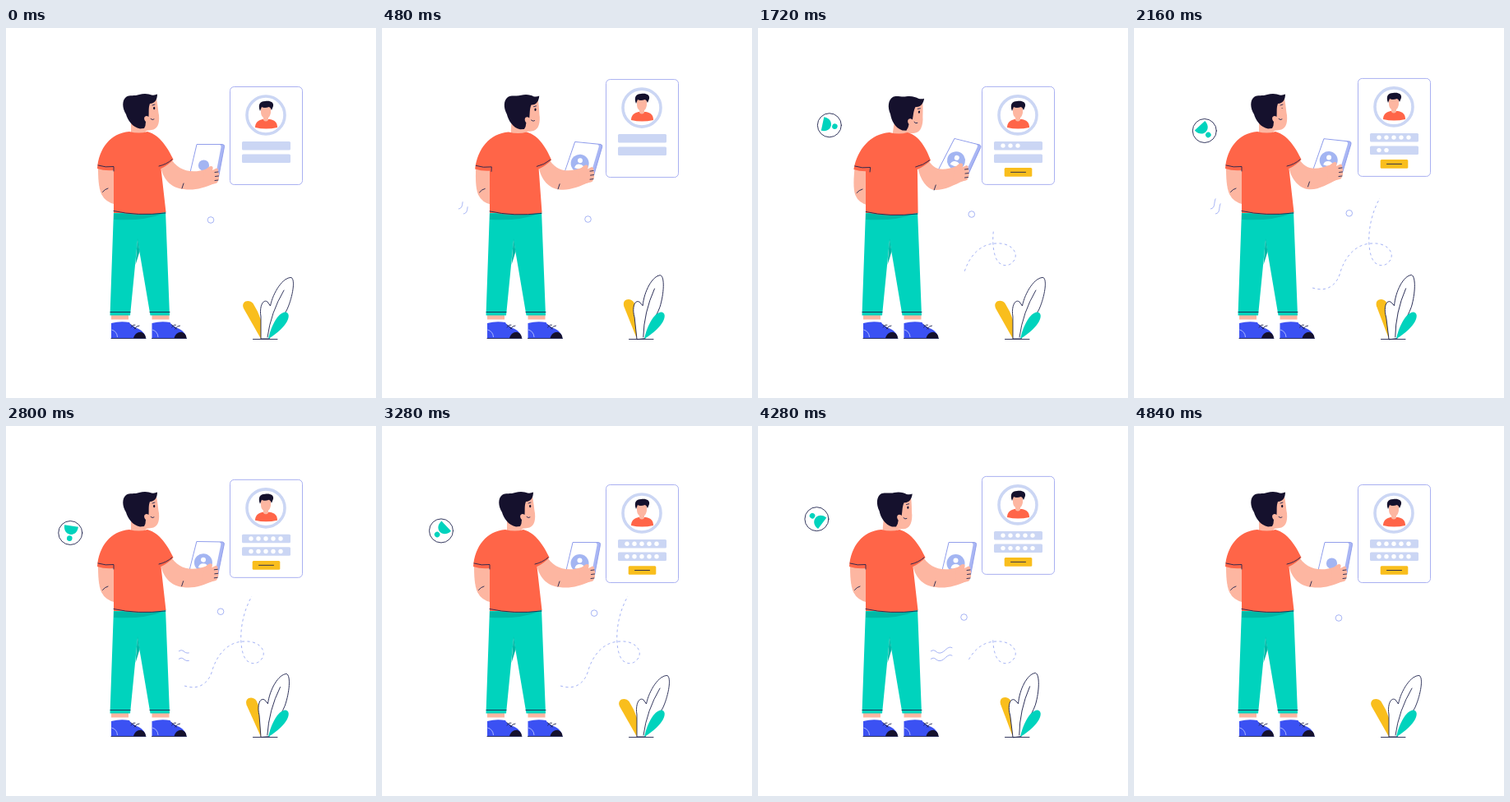
Recreate the animation shown at these times as an HTML page. Size 450x450 px, loop 4.88 s.

```html
<!DOCTYPE html>
<html lang="en">
<head>
<meta charset="utf-8">
<title>Profile login</title>
<style>
  html, body { margin: 0; width: 100%; height: 100%; overflow: hidden; background: #fff; }
  svg { display: block; width: 100vw; height: 100vh; }
  .skin { fill: #fdb6a1; }
  .navy { fill: #15112d; }
  .shirt { fill: #ff6548; }
  .teal { fill: #00d3bd; }
  .pale { fill: #cbd6f4; }
  .white { fill: #fff; }
  .yellow { fill: #f9be1d; }
  .ink { fill: none; stroke: #20244f; stroke-width: .9; stroke-linecap: round; }
  .thin { fill: none; stroke: #8fa0f2; stroke-width: .8; }
</style>
</head>
<body>
<svg viewBox="0 0 450 450">
  <defs>
    <path id="trail" pathLength="100" d="M217 316C235 322 246 312 250 300C256 278 270 262 290 262C305 261 315 270 313 279C310 290 297 292 291 283C283 270 283 235 299 207"/>
    <mask id="trailMask" maskUnits="userSpaceOnUse" x="200" y="190" width="130" height="140">
      <use id="trailTrim" href="#trail" fill="none" stroke="#fff" stroke-width="5"/>
    </mask>
    <path id="wave" pathLength="100" d="M238 271c-7-6-10 4-16 5s-6-6-12-2"/>
    <path id="spark" pathLength="100" d="M93 220c6-1 4-7 6-12s11-2 16-8"/>
    <g id="shoe">
      <path class="skin" d="M128 347H149V354.500H128Z"/>
      <path d="M128 359Q139 356 150 358C154 366 168 364 170 377.500H128Z" fill="#3b51f3"/>
      <path class="navy" d="M155 377.500C156 372 161 369 165 370Q170 372 170 377.500Z"/>
      <path d="M128.500 367Q135 369 135.500 376" fill="none" stroke="#a9b7ff"/>
      <path class="ink" d="M152 364q3-4 5-3M156 366q3-4 6-4M152 361l6 5M128 377.500H170"/>
    </g>
  </defs>

  <g mask="url(#trailMask)"><use class="thin" href="#trail" stroke-dasharray="1.3 1.4"/></g>
  <g id="waves" class="thin"><use href="#wave"/><use href="#wave" y="9.500"/></g>
  <g id="sparks" class="thin"><use href="#spark"/><use href="#spark" x="6" y="6"/></g>
  <circle id="bubble" class="thin" r="3.800"/>

  <g id="badge">
    <circle class="ink" r="14.500"/>
    <g id="badgeMark" class="teal">
      <path d="M-8.500-8.500C0-8.500 2-3 2 0S0 8.500-8.500 8.500Z"/>
      <circle cx="6.700" r="3.300"/>
    </g>
  </g>

  <g id="card">
    <rect x="272.500" y=".5" width="88" height="119" rx="5" fill="#fff" stroke="#a0a8f0" stroke-width=".9"/>
    <circle cx="316" cy="35" r="23" fill="#fff" stroke="#cbd6f4" stroke-width="3.600"/>
    <path class="shirt" d="M303 50C303 43 308 41 312 40H321C327 41 330 44 330 50Q316 53 303 50Z"/>
    <path class="skin" d="M310 25Q316 20 322 25V32Q321 37 319 38V41Q316 44 313 41V38Q310 36 310 31Z"/>
    <path class="navy" d="M309 30C306 22 309 18 315 18C321 17 326 19 325 24L323 29Q322 26 320 25Q314 27 311 25Z"/>
    <rect class="pale" x="287" y="67" width="59" height="10.500" rx="1.500"/>
    <rect class="pale" x="287" y="82.500" width="59" height="10.500" rx="1.500"/>
    <g id="dots" class="white"></g>
    <g id="button">
      <rect class="yellow" x="-16.800" y="-5.300" width="33.600" height="10.600" rx="1.500"/>
      <path class="ink" d="M-9 0H9"/>
    </g>
  </g>

  <g id="phone">
    <path d="M232 141.500H263.500Q266 142 265.500 144.500L258 184H222Z" fill="#a9b6f4" stroke="#8c99ea" stroke-width=".9"/>
    <path class="white" d="M232.500 142H260Q262 142.500 261.500 145L254 184H222.500Z"/>
    <g id="phoneIcon">
      <circle r="11" fill="#a3b5f2"/>
      <g id="phoneUser" class="white">
        <circle cy="-3.500" r="3"/>
        <path d="M-6 6Q-5 1 0 1T6 6Q0 8-6 6Z"/>
      </g>
    </g>
  </g>

  <use href="#shoe"/>
  <use href="#shoe" x="49.500"/>
  <path class="teal" d="M131 222H194L199 349.500H175.500L160 258L151 349.500H126.500Z"/>
  <path d="M131 226H190Q168 235 131 233ZM160 256L162.500 272L157.500 288Z" fill="#00b8a6"/>
  <path class="ink" d="M127 345.500H151M175 345.500H199"/>

  <g id="forearm">
    <path class="skin" d="M112 170C112 182 112.500 194 116 202Q121 212 133 214.500V170Z"/>
    <path class="ink" d="M117.500 199.500Q120 196 124 195"/>
  </g>
  <g id="head">
    <path class="skin" d="M167 90L183 86C185 96 185 101 186 106C187 117 184 123 177 124C171 125 169 124 168 131H152V116Z"/>
    <path class="navy" d="M163 122.500C154 121 148 112 146 105C141 97 141 88 146 84C150 81 157 83 162 81C168 79 174 80 177 81.500Q181 82 184 80.500C184 87 181 92 175 92C173 97 174 102 173.500 108C169 105 166 110 170 114Q170 119 168 122Z"/>
    <ellipse id="eye" class="navy" cx="180.200" cy="97.500" rx="1.100"/>
    <path class="ink" d="M176 110.500q2 2 4 .5M178 94l3-1"/>
  </g>
  <path id="arm" class="skin"/>
  <g id="hand">
    <path class="skin" d="M241 175Q245 169 249 168Q253 168 251 173L256 170.500Q259 171 258 175Q260 177 258.500 180Q260 183 258 185Q258 189 253 189.500Q245 192 240 191Z"/>
    <path class="ink" d="M254 175.500l4-.5M254.500 180.500l4-.5M254 185.500l4-.5" stroke-width=".7"/>
  </g>
  <path id="elbow" class="ink" d="M214 195l2-6"/>
  <path class="shirt" d="M131 172H150V225H131Z"/>
  <g id="shirt">
    <path class="shirt" d="M111 171C113 146 127 128 150 126Q162 129 172 126C187 130 197 146 203.500 160Q197 167 188.500 171L194.500 224Q162 230 131 223V173Q120 174 111 171Z"/>
    <path class="ink" d="M112 167Q121 170 131 168.500V174M186 168Q195 166 202 160M131 222.500Q160 229 194 225"/>
  </g>

  <path id="yellowLeaf" class="yellow" d="M310 378L289 341C285 332 296 329 300.500 335Q307 345 310 355Z"/>
  <g id="tallLeaf">
    <path d="M310 378V351C308 340 312 329 318 333L321.500 338C325 321 337 303 347 303.500C352 306 349 326 342 342C335 356 325 364 320 378Z" fill="#fff" stroke="#20244f" stroke-width=".9"/>
    <path class="ink" d="M318 376Q322 346 338 319"/>
  </g>
  <path class="teal" d="M319 378C322 364 330 346 340 345.500C348 347 344 363 319 378Z"/>
  <path class="ink" d="M300.500 378.500H330"/>
</svg>

<script>
const LOOP = 4880, STEP = 40, BOB = LOOP / 3;
const el = {};
document.querySelectorAll('[id]').forEach(node => el[node.id] = node);

const set = (node, name, value) => node.setAttribute(name, value);
const move = (node, value) => set(node, 'transform', value);
const ramp = (t, from, to) => Math.max(0, Math.min(1, (t - from) / (to - from)));
const smooth = x => x * x * (3 - 2 * x);
const overshoot = x => 1 + 5 * (x - 1) ** 3 + 4 * (x - 1) ** 2;
// Eases from 0 to 1 and later back to 0.
const pulse = (t, rise, top, fall, end) => smooth(ramp(t, rise, top)) - smooth(ramp(t, fall, end));

// Shows only the part of a path between two fractions of its length.
function trim(path, from, to) {
  set(path, 'visibility', to > from ? 'visible' : 'hidden');
  set(path, 'stroke-dasharray', `0 ${100 * from} ${100 * Math.max(0, to - from)} 300`);
}

for (let i = 0; i < 10; i++) {
  const dot = document.createElementNS('http://www.w3.org/2000/svg', 'circle');
  set(dot, 'cx', 298 + i % 5 * 9);
  set(dot, 'cy', i < 5 ? 72.2 : 87.7);
  set(dot, 'r', 2.7);
  el.dots.append(dot);
}

function drawPerson(t) {
  const lean = pulse(t, 200, 850, 1740, 2140);
  const reach = pulse(t, 1740, 2160, 2160, 3000);
  const nod = lean + .7 * pulse(t, 3300, 3760, 4200, 4700);
  const skew = `matrix(1 0 ${-.1 * lean} 1 ${22.5 * lean} ${lean})`;
  move(el.forearm, skew);
  move(el.shirt, skew);
  move(el.head, `translate(${12.5 * lean} ${2 * lean}) rotate(${8 * nod} 163 122)`);
  set(el.eye, 'ry', 1.7 - 1.4 * pulse(t, 2040, 2140, 2180, 2280));

  const x = -2.5 * lean - 5 * reach, y = -3.5 * lean - 5 * reach;
  move(el.phone, `translate(${x} ${y}) rotate(${14 * lean + 6 * reach} 251 178)`);
  move(el.hand, `translate(${x} ${y})`);
  const size = pulse(t, 60, 450, 4400, 4780);
  move(el.phoneIcon, `translate(240.500 167) scale(${.6 + .4 * size})`);
  move(el.phoneUser, `scale(${size})`);

  const s = 6 * lean, at = (px, py) => `${px + x} ${py + y}`;
  set(el.arm, 'd', `M${200 + s} ${158 + lean}C${208 + s} 172 ${at(224, 179)} ${at(245, 171)}L${at(253, 189)}
    C${at(240, 195)} ${228 + x} 198 ${216 + x} ${196 + lean}C${203 + s / 2} 195 ${191 + s} 186 ${188 + s} 168Z`);
  move(el.elbow, `translate(${s / 4 + x / 2} ${2 * lean - 2 * reach})`);
}

function drawBadge(t) {
  const since = t - 1720;
  const orbit = (.091 * since - 10) * Math.PI / 180;
  const scale = t < 1020 ? 0 : overshoot(ramp(t, 1020, 1240)) - smooth(ramp(t, 4480, 4720));
  move(el.badge, `translate(${78 + 9 * Math.cos(orbit)} ${120 + 10 * Math.sin(orbit)}) scale(${Math.max(0, scale)})`);
  move(el.badgeMark, `rotate(${12 + .08 * since})`);
}

function drawTrails(t, phase) {
  const half = .5 * Math.min(ramp(t, 912, 2160), 1 - ramp(t, 3900, 4700));
  trim(el.trailTrim, .5 - half, .5 + half);
  const sweep = (group, start, full, leave, gone) => {
    for (const path of group.children) trim(path, ramp(phase, leave, gone), ramp(phase, start, full));
  };
  sweep(el.waves, .45, .6, .62, .8);
  sweep(el.sparks, .2, .48, .4, .63);
  const swing = Math.cos(2 * Math.PI * (t + 60) / LOOP);
  move(el.bubble, `translate(${255.5 - 6.5 * swing} ${229.3 + 4.2 * swing})`);
}

function draw(t) {
  const phase = t / BOB % 1;
  const wave = Math.cos(2 * Math.PI * (phase - .48));
  const bob = .5 + .25 * wave * (3 - wave * wave);

  move(el.card, `translate(0 ${71 - 11.4 * bob})`);
  [...el.dots.children].forEach((dot, i) =>
    set(dot, 'visibility', t >= 1400 + 120 * i ? 'visible' : 'hidden'));
  move(el.button, `translate(316.500 104.500) scale(${smooth(ramp(t, 500, 800))})`);
  move(el.yellowLeaf, `rotate(${10 * bob} 310 378)`);
  move(el.tallLeaf, `rotate(${-8 * bob} 317 378)`);

  drawPerson(t);
  drawBadge(t);
  drawTrails(t, phase);
}

const begin = performance.now();
function tick() {
  const t = Math.max(0, performance.now() - begin) % LOOP;
  draw(Math.floor(t / STEP) * STEP);
  requestAnimationFrame(tick);
}
tick();
</script>
</body>
</html>
```
